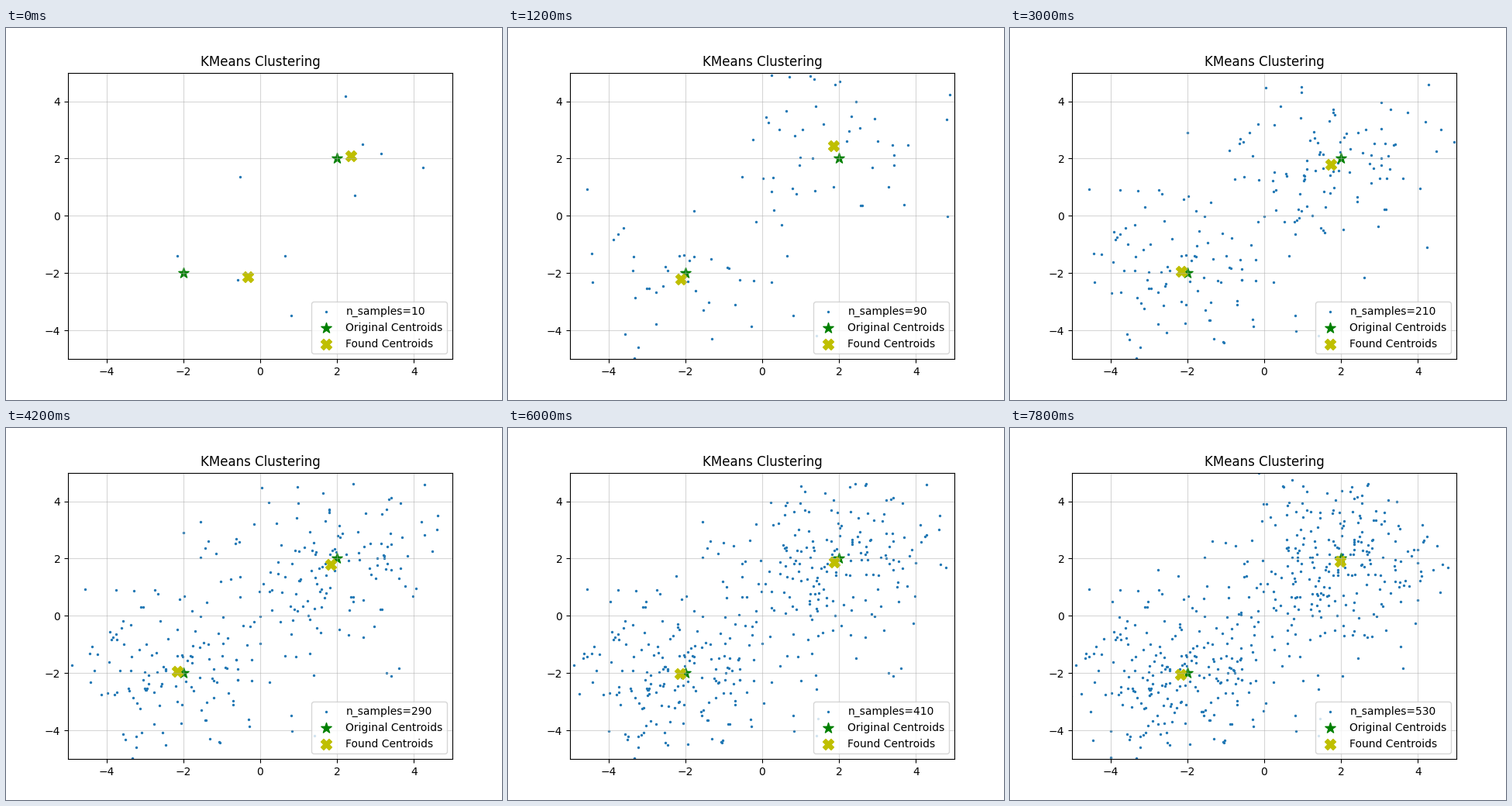
Animation, 640 px wide and 480 px high, one loop 8 s. Source, as a matplotlib script:

```python
import numpy as np
import matplotlib.pyplot as plt
from matplotlib.animation import FuncAnimation

INTERVAL = 100          # ms per tick
TICKS = 80
TICKS_PER_STEP = 3      # the sample count grows every 300 ms
STEPS = -(-TICKS // TICKS_PER_STEP)
FIRST, GROWTH = 10, 20
SPREAD = 1.5
CENTERS = np.array([[-2.0, -2.0], [2.0, 2.0]])

max_samples = FIRST + GROWTH * (STEPS - 1)
noise = SPREAD * np.random.RandomState(0).normal(size=(max_samples, 2))


def make_blobs(n):
    """First half of the noise surrounds one center, the rest the other."""
    half = n // 2
    return np.vstack([noise[:half] + CENTERS[0], noise[half:n] + CENTERS[1]])


def kmeans(points, iterations=100):
    means = CENTERS
    for _ in range(iterations):
        distances = np.linalg.norm(points[:, None] - means, axis=2)
        labels = distances.argmin(axis=1)
        updated = np.array([points[labels == k].mean(axis=0) for k in range(2)])
        if np.allclose(updated, means):
            break
        means = updated
    return means


counts = [FIRST + GROWTH * step for step in range(STEPS)]
blobs = [make_blobs(n) for n in counts]
found_means = [kmeans(points) for points in blobs]

fig, ax = plt.subplots(figsize=(6.4, 4.8), dpi=100)
ax.set(xlim=(-5, 5), ylim=(-5, 5), title="KMeans Clustering")
ax.grid(alpha=0.5)

samples = ax.scatter(*blobs[0].T, s=2, label=f"n_samples={counts[0]}")
ax.scatter(*CENTERS.T, s=100, c="g", marker="*", label="Original Centroids")
found = ax.scatter(*found_means[0].T, s=100, c="y", marker="X",
                   label="Found Centroids")
legend = ax.legend(loc="lower right")


def update(tick):
    step = tick // TICKS_PER_STEP
    samples.set_offsets(blobs[step])
    found.set_offsets(found_means[step])
    legend.get_texts()[0].set_text(f"n_samples={counts[step]}")
    return samples, found, legend


anim = FuncAnimation(fig, update, frames=TICKS, interval=INTERVAL,
                     repeat=True, repeat_delay=0)
plt.show()
```
